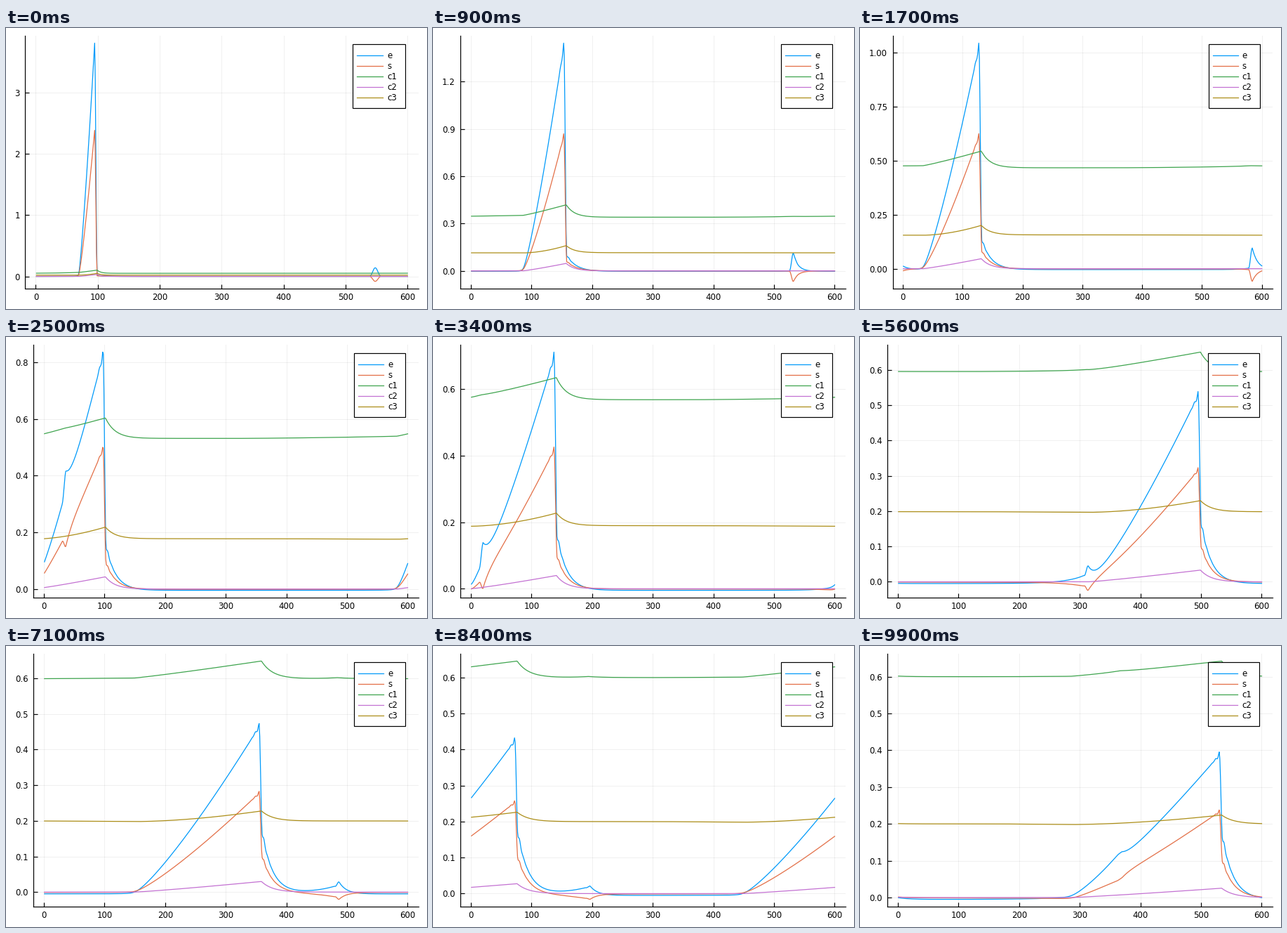
These frames come from a looping animation (600x400 px, 10000 ms). A matplotlib script:

```python
import numpy as np
import matplotlib
import matplotlib.pyplot as plt
from matplotlib.animation import FuncAnimation
from matplotlib.patches import Rectangle

matplotlib.rcParams["font.family"] = "DejaVu Sans"

FRAMES, N = 100, 600
PX = 0.72                      # points per pixel at 100 dpi
FONT = 11.7 * PX
LINE, AXIS = 1.25 * PX, 1.2 * PX
TOP, BOTTOM, RIGHT = 11.3, 370.8, 588
LEFT = {0: 27.5, 1: 39.3, 2: 46.5}    # axis position by label decimals
SERIES = {"e": "#009afa", "s": "#e36f47", "c1": "#3ea44e",
          "c2": "#c371d2", "c3": "#ac8e18"}
NICE = [(1, 1), (5, 0.9), (2, 0.7), (2.5, 0.5), (3, 0.2)]

x = np.arange(1, N + 1)


def rise(f, tau):
    return 1 - np.exp(-f / tau)


def height(f):
    """Shock height; its inverse square grows almost linearly."""
    return (0.0665 * f + 0.069 - 0.414 * rise(f, 14)) ** -0.5


# Shock path: the speed grows with the height.
fine = np.linspace(0, FRAMES, FRAMES * 20 + 1)
speed = 69.885 + 1.508 * height(fine)
path = 95 + np.concatenate([[0], np.cumsum((speed[1:] + speed[:-1]) / 40)])


def wrap(d, low):
    return (d - low) % N + low


def smooth(t):
    t = np.clip(t, 0, 1)
    return t * t * (3 - 2 * t)


def shock(f, u, width):
    """Ramp, sharp front and decaying foot of the right-going wave."""
    a = height(f)
    z = 1 + np.minimum(u, 0) / width
    z = (z + np.sqrt(z * z + 0.002)) / 2          # soft toe
    rip = 0.022 * rise(f, 5)
    ramp = a * ((1 - rip) * z ** 1.2
                + rip * np.cos(2 * np.pi * u / 6.5) * np.exp(np.minimum(u, 0) / 4))
    v = np.maximum(u, 0)
    foot = 0.148 * (1 - 0.92 * np.exp(-f / 12))
    tail = foot * (np.exp(-(v - 8) / (15 + 0.03 * f))
                   + 0.07 * np.cos(2 * np.pi * (v - 8.5) / 6.5) * np.exp(-np.abs(v - 6) / 4))
    drop = smooth(v / (5 - np.exp(-f / 8)))
    return np.where(u <= 0, ramp, a * (1 - drop) + tail * drop)


def bump(f, w):
    """Small left-going wave: precursor, front and decay."""
    top = 0.14 * np.exp(-f / 50)
    pre = 0.021 * rise(f * f, 900) * np.exp(np.minimum(w + 8, 0) / (5 + 0.5 * f))
    front = pre + (top - pre) * smooth((w + 6) / 6)
    back = top * np.exp(-np.maximum(w, 0) / (7 + 6 * rise(f, 40)))
    start = top * np.cos(np.pi * np.clip(w, -9, 9) / 18) ** 2
    m = np.exp(-f / 4)
    return m * start + (1 - m) * np.where(w > 0, back, front)


def curves(f):
    u = wrap(x - np.interp(f, fine, path), -380)
    w = wrap(x - (548 - 68.47 * f), -300)
    width = 98.3 / height(f)
    main, side = shock(f, u, width), bump(f, w)
    e = main + side - 0.005 * rise(f, 10)
    s = (0.596 + 0.03 * np.exp(-f / 5)) * main - 0.58 * side - 0.001 * rise(f, 10)

    # Concentrations: hump under the shock plus a wake behind it.
    z = np.clip((u + width) / (width + 4), 0, 1)
    fall = np.exp(-np.maximum(u - 4, 0) / (6 + 9 * rise(f, 6) + 0.05 * f))
    top = (0.03 + 0.064 * np.exp(-f / 60)) * (1 - 0.45 * np.exp(-f / 5))
    fade = np.clip((u + 380) / (380 - width), 0, 1) ** (1.5 + 8.5 * np.exp(-f / 3))
    wake = np.where(u < -width, fade, np.where(u < 4, 1 - z, 0))
    lift = 0.003 * rise(f, 6) * np.exp(-np.abs(w + 3) / 25)
    relax = np.exp(-f / 12)

    def hump(power):
        return top * np.where(u < 4, z ** power, fall)

    c1 = 0.6 - 0.55 * relax + hump(1.1) + 0.015 * np.exp(-f / 35) * wake + lift
    c2 = 0.6 * hump(1.15)
    c3 = 0.2 - 0.18 * relax + 0.57 * hump(1.8) - 0.0018 * rise(f, 6) * wake
    return [e, s, c1, c2, c3]


def nice_ticks(lo, hi):
    """Pick the tick step with the best mix of count, coverage and niceness."""
    best = -1
    for z in (-2, -1, 0):
        for q, score in NICE:
            step = q * 10.0 ** z
            i = np.arange(np.ceil(lo / step), np.floor(hi / step) + 1)
            n = len(i)
            if not 4 <= n <= 8:
                continue
            total = ((1 - abs(n - 5) / 5) / 4 + 0.5 * (hi - lo) / ((n - 1) * step)
                     + score / 4 - n * 1e-6)
            if total > best:
                best, ticks, unit = total, i * step + 0.0, step
    digits = next(d for d in range(4) if abs(round(unit, d) - unit) < 1e-9)
    return ticks, digits


fig = plt.figure(figsize=(6, 4), dpi=100, facecolor="white")
ax = fig.add_axes([0.1, 0.1, 0.8, 0.8])
ax.spines[["top", "right"]].set_visible(False)
ax.spines[["left", "bottom"]].set_linewidth(AXIS)
ax.set_axisbelow(True)
ax.grid(color="black", alpha=0.06, lw=PX)
ax.tick_params(direction="in", length=6 * PX, width=AXIS, labelsize=FONT)
ax.tick_params(axis="x", pad=6.5 * PX)
ax.tick_params(axis="y", pad=7.7 * PX)
margin = 0.03 * (N - 1)
ax.set_xlim(1 - margin, N + margin)
ax.set_xticks(range(0, 601, 100))
lines = [ax.plot(x, 0 * x, color=c, lw=LINE)[0] for c in SERIES.values()]

# Legend in pixel coordinates
over = fig.add_axes([0, 0, 1, 1], zorder=2)
over.set_xlim(0, 600)
over.set_ylim(400, 0)
over.axis("off")
box = over.add_patch(Rectangle((495, 23.4), 75, 90.5, fc="white", ec="black", lw=AXIS))
samples, texts = [], []
for i, (name, color) in enumerate(SERIES.items()):
    y = 38.6 + 15.1 * i
    samples += over.plot([0, 1], [y, y], color=color, lw=LINE)
    texts.append(over.text(0, y + 4.4, name, fontsize=FONT, va="baseline"))


def place(left):
    span = RIGHT - left
    ax.set_position([left / 600, 1 - BOTTOM / 400, span / 600, (BOTTOM - TOP) / 400])
    right = RIGHT - 0.0325 * span - 0.8
    start = right - 0.13 * span - 2.3
    box.set_x(start)
    box.set_width(right - start)
    for line, text in zip(samples, texts):
        line.set_xdata([start + 0.0115 * span, start + 0.077 * span])
        text.set_x(start + 0.088 * span)


def draw(f):
    data = curves(f)
    for line, y in zip(lines, data):
        line.set_ydata(y)
    lo, hi = np.min(data), np.max(data)
    pad = 0.03 * (hi - lo)
    lo, hi = lo - pad, hi + pad
    ticks, digits = nice_ticks(lo, hi)
    ax.set_ylim(lo, hi)
    ax.set_yticks(ticks, [f"{t:.{digits}f}" for t in ticks])
    place(LEFT[digits])
    return lines


anim = FuncAnimation(fig, draw, frames=FRAMES, interval=100, repeat=True,
                     repeat_delay=0, blit=False)
plt.show()
```
